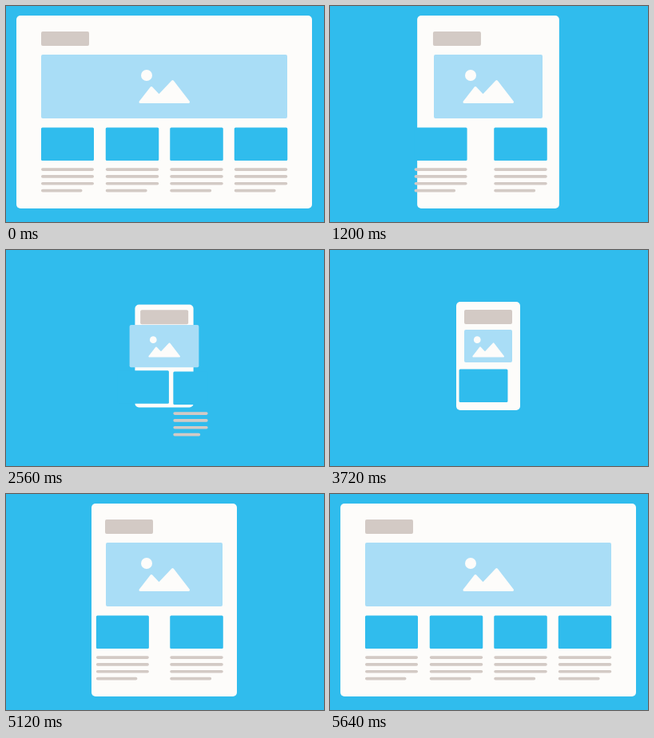
Animation, 398 px wide and 271 px high, one loop 5720 ms. Source, as an HTML page with a canvas:

```html
<!DOCTYPE html>
<html lang="en">
<head>
<meta charset="utf-8">
<title>Responsive layout</title>
<style>
html, body { margin: 0; width: 100%; height: 100%; overflow: hidden; background: #30bced; }
canvas { display: block; width: 398px; height: 271px; }
</style>
</head>
<body>
<canvas id="stage"></canvas>
<script>
const LOOP = 5720, MOVE = 300, MID = 198;
const BLUE = '#30bced', WHITE = '#fdfcfa', SKY = '#a9ddf6', GRAY = '#d3cac5';

const canvas = document.getElementById('stage');
const ratio = window.devicePixelRatio || 1;
canvas.width = 398 * ratio;
canvas.height = 271 * ratio;
const ctx = canvas.getContext('2d');

const clamp = v => Math.min(1, Math.max(0, v));

function backOut(t) {
  const u = 1 - t;
  return 1 - 2.7 * u ** 3 + 1.7 * u ** 2;
}

// A track starts at a value and springs to each [time, value] in turn.
const track = (first, ...moves) => time =>
  moves.reduce((v, [start, to]) => v + (to - v) * backOut(clamp((time - start) / MOVE)), first);

const tracks = {
  pageHalf: track(185, [940, 91], [2425, 40], [3866, 91], [5175, 185]),
  pageHeight: track(242, [2425, 136], [3866, 242]),
  headX: track(44, [974, 124], [2449, 168], [3984, 124], [5275, 44]),
  headY: track(32, [2449, 75], [3984, 32]),
  imageWidth: track(308, [974, 146], [2503, 60], [3930, 146], [5230, 308]),
  imageHeight: track(80, [2503, 41], [3930, 80]),
  imageY: track(101, [2449, 120.5], [4012, 101]),
  iconBase: track(122, [2449, 134.5], [4012, 122]),
  iconScale: track(1, [2449, 0.625], [4012, 1]),
  firstX: track(44, [1134, 125], [2536, 168], [3711, 125], [5111, 44]),
  firstY: track(152.5, [2536, 149], [3711, 152.5]),
  firstWidth: track(66, [2536, 60], [3711, 66]),
  second: track(1, [960, 0], [5190, 1]),
  third: track(1, [2536, 0], [3740, 1]),
  fourth: track(1, [960, 0], [5240, 1])
};

// Text lines of the first column: when each one retracts and returns.
const lineTimes = [
  { out: 2120, back: 3780 },
  { out: 1960, back: 4080 },
  { out: 1800, back: 4320 },
  { out: 1640, back: 4600 }
];

function box(x, y, w, h, r, color) {
  if (w <= 0 || h <= 0) return;
  ctx.fillStyle = color;
  ctx.beginPath();
  ctx.roundRect(x, y, w, h, Math.min(r, w / 2, h / 2));
  ctx.fill();
}

function textLines(x, width, shown = () => 1) {
  for (let i = 0; i < 4; i++) {
    const full = i === 3 ? width * 0.78 : width;
    box(x, 203.2 + i * 8.85, full * shown(i), 3.7, 1.8, GRAY);
  }
}

function firstLineShown(i, time) {
  const { out, back } = lineTimes[i];
  return 1 - clamp((time - out) / 160) + clamp((time - back) / 240);
}

function column(center, scale) {
  const width = 66.5 * scale;
  if (width <= 0) return;
  box(center - width / 2, 152.5, width, 41.5, 1.5, BLUE);
  textLines(center - width / 2, width);
}

function icon(base, scale) {
  ctx.save();
  ctx.translate(MID, base);
  ctx.scale(scale, scale);
  ctx.fillStyle = ctx.strokeStyle = WHITE;
  ctx.lineWidth = 3;
  ctx.lineJoin = 'round';
  ctx.beginPath();
  ctx.arc(-22, -35, 7, 0, Math.PI * 2);
  ctx.fill();
  ctx.beginPath();
  [[-30, -1.5], [-16, -19.5], [-6.5, -9.5], [10.5, -27.5], [30.5, -1.5]]
    .forEach(([x, y]) => ctx.lineTo(x, y));
  ctx.closePath();
  ctx.fill();
  ctx.stroke();
  ctx.restore();
}

function draw(time) {
  const v = {};
  for (const name in tracks) v[name] = tracks[name](time);

  ctx.setTransform(ratio, 0, 0, ratio, 0, 0);
  ctx.fillStyle = BLUE;
  ctx.fillRect(0, 0, 398, 271);

  box(MID - v.pageHalf, 133 - v.pageHeight / 2, v.pageHalf * 2, v.pageHeight, 5, WHITE);

  column(158, v.second);
  column(217 + 21.5 * v.third, v.third);
  column(319, v.fourth);
  box(v.firstX, v.firstY, v.firstWidth, 41.5, 1.5, BLUE);
  textLines(v.firstX, 66, i => firstLineShown(i, time));

  box(v.headX, v.headY, 60, 18, 2, GRAY);
  box(MID - v.imageWidth / 2, v.imageY - v.imageHeight / 2, v.imageWidth, v.imageHeight, 2, SKY);
  icon(v.iconBase, v.iconScale);
}

const began = performance.now();
function tick() {
  draw((performance.now() - began) % LOOP);
  requestAnimationFrame(tick);
}
tick();
</script>
</body>
</html>
```
